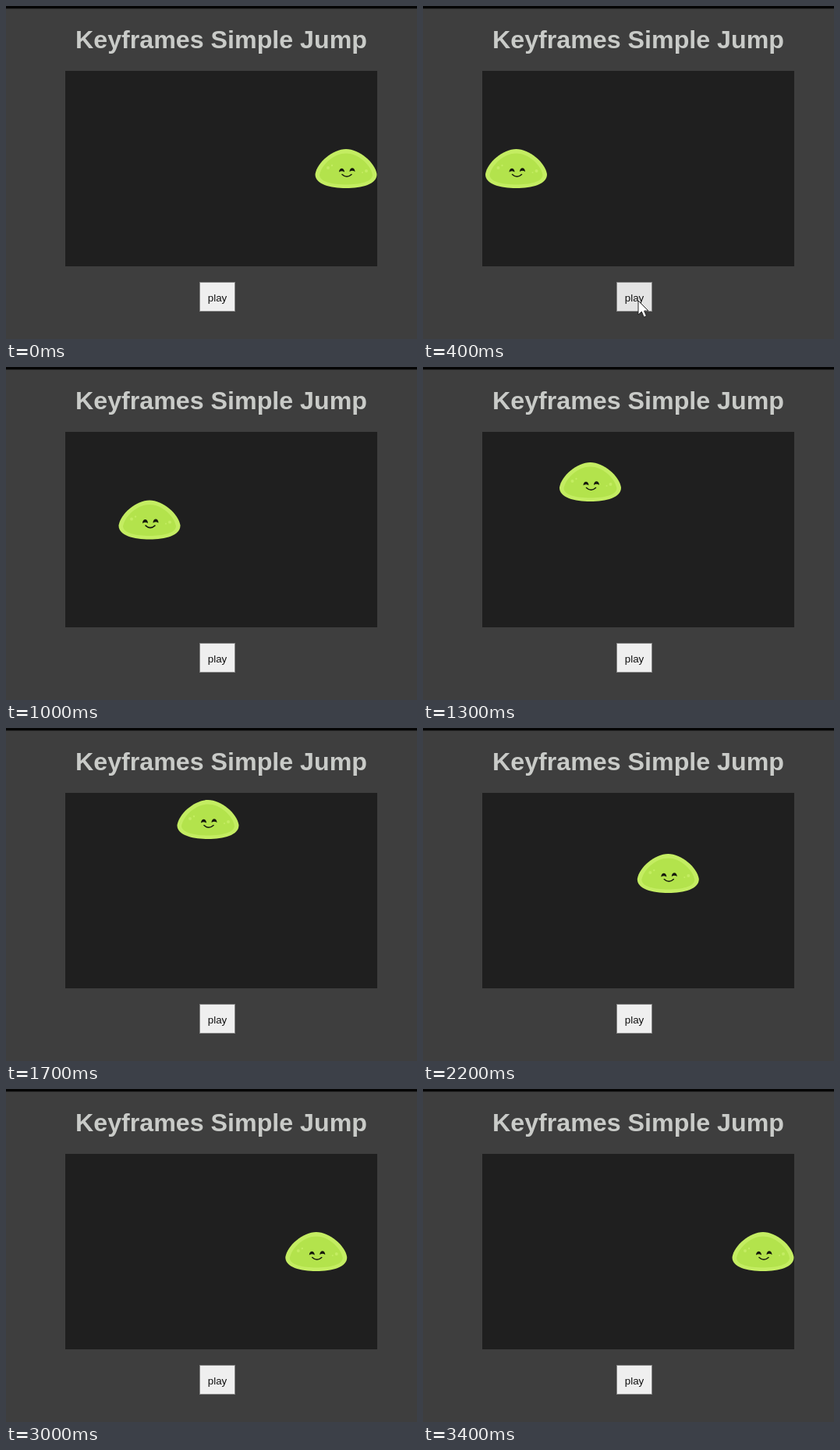
These frames come from a looping animation (527 by 426 pixels, 4100 ms). An HTML page:

```html
<!DOCTYPE html>
<html lang="en">
<head>
<meta charset="utf-8">
<title>Keyframes Simple Jump</title>
<style>
  html, body { margin: 0; width: 100%; height: 100%; overflow: hidden; background: #3e3e3e; }
  svg { display: block; width: 527px; height: 426px; }
  text { font-family: "Liberation Sans", Arial, sans-serif; text-anchor: middle; }
</style>
</head>
<body>
<svg viewBox="0 0 527 426">
  <rect width="527" height="426" fill="#3e3e3e"/>
  <rect width="527" height="3" fill="#050505"/>
  <rect y="3" width="527" height="1" fill="#2b2b2b"/>
  <text x="276" y="54" font-size="32.2" font-weight="bold" fill="#c9cbc8">Keyframes Simple Jump</text>
  <rect x="76" y="83" width="400" height="250" fill="#1f1f1f"/>

  <g id="slime">
    <path fill="#c4ed62" d="M-39.5 7C-37-8-17-25 0-25S37-8 39.5 7C40 20 20 25 0 25S-40 20-39.5 7Z"/>
    <path fill="#b3e34c" d="M-34 8C-31-6-15-19.5 0-19.5S31-6 34 8C34 17 17 20.500 0 20.500S-34 17-34 8Z"/>
    <g fill="#c4ed62">
      <circle cx="-23" cy="-1" r="2"/>
      <circle cx="-18" cy="-4" r="1.200"/>
      <circle cx="26" cy="3" r="2"/>
      <circle cx="21" cy="5" r="1"/>
    </g>
    <g fill="#15180c">
      <path d="M-9 4.500C-9-2-2-2-2 4.500Q-5.500 2-9 4.500Z"/>
      <path d="M4.500 4C4.500-2.500 11.500-2.500 11.500 4Q8 1.500 4.500 4Z"/>
    </g>
    <path d="M-5 7.500Q1 13 7 7.500" fill="none" stroke="#15180c" stroke-width="1.500" stroke-linecap="round"/>
  </g>

  <rect id="button" x="248.5" y="353.500" width="45" height="37" fill="#efefef" stroke="#858585"/>
  <text x="271" y="378" font-size="13.333" fill="#111">play</text>
  <path id="cursor" d="M0 0V18L4.300 14 7.200 21 10.500 19.500 7.600 13H13Z" fill="#fff" stroke="#222" stroke-width="1"/>
</svg>
<script>
const LOOP = 4100, STEP = 100;
const START = 355, END = 3360;
const slime = document.getElementById("slime");
const button = document.getElementById("button");
const cursor = document.getElementById("cursor");

// [time, x of the slime's centre]
const run = [[START, 116], [400, 119.5], [700, 153.5], [1300, 214.5], [1700, 259], [2200, 314.3], [2600, 355.3], [END, 436]];
// [time, height above the ground]
const jump = [[START, 0], [850, 0], [1300, 61], [1700, 91], [1790, 93], [2200, 22], [2600, 4], [2900, 0], [END, 0]];

const slope = (a, b) => (b[1] - a[1]) / (b[0] - a[0]);

function linear(keys, i, t) {
  return keys[i][1] + slope(keys[i], keys[i + 1]) * (t - keys[i][0]);
}

// Harmonic mean of neighbouring slopes, so the curve never overshoots a key.
function tangent(keys, i) {
  if (i === 0 || i === keys.length - 1) return 0;
  const a = slope(keys[i - 1], keys[i]), b = slope(keys[i], keys[i + 1]);
  return a * b > 0 ? 2 * a * b / (a + b) : 0;
}

function smooth(keys, i, t) {
  const [t0, v0] = keys[i], [t1, v1] = keys[i + 1];
  const span = t1 - t0, u = (t - t0) / span, w = 1 - u;
  return v0 * w * w * (1 + 2 * u) + v1 * u * u * (3 - 2 * u)
    + span * u * w * (w * tangent(keys, i) - u * tangent(keys, i + 1));
}

function sample(keys, t, ease) {
  const last = keys.length - 1;
  if (t >= keys[last][0]) return keys[last][1];
  return ease(keys, keys.findIndex((key, i) => t < keys[i + 1][0]), t);
}

function draw(time) {
  const t = Math.floor(time % LOOP / STEP) * STEP;
  const playing = t < START ? END : t;
  const x = sample(run, playing, linear);
  const y = 208 - sample(jump, playing, smooth);
  slime.setAttribute("transform", `translate(${x} ${y})`);

  const hovered = t >= 100 && t <= 700;
  button.setAttribute("fill", hovered ? "#e4e4e4" : "#efefef");
  cursor.setAttribute("visibility", hovered ? "visible" : "hidden");
  cursor.setAttribute("transform", t < 700 ? "translate(276 377)" : "translate(285 392)");
}

const begin = performance.now();
function tick() {
  draw(performance.now() - begin);
  requestAnimationFrame(tick);
}
draw(0);
requestAnimationFrame(tick);
</script>
</body>
</html>
```
